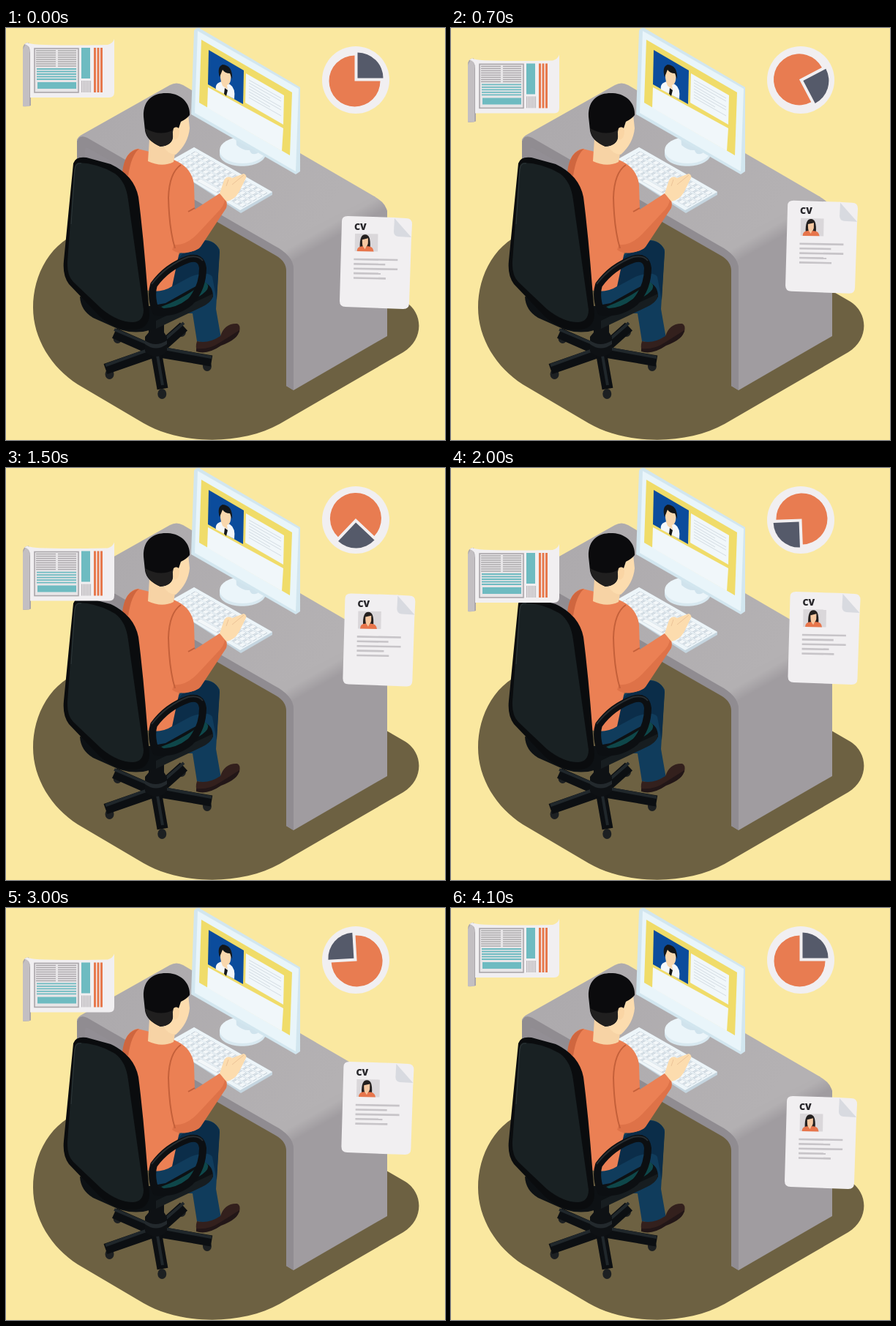
These frames come from a looping animation (600x563 px, 4150 ms). An HTML page:

```html
<!DOCTYPE html>
<html lang="en">
<head>
<meta charset="utf-8">
<title>Working at the desk</title>
<style>
  html, body { margin: 0; width: 100%; height: 100%; overflow: hidden; background: #fae8a0; }
  svg { display: block; width: 100%; height: 100%; }
</style>
</head>
<body>
<svg viewBox="0 0 600 563" preserveAspectRatio="none">
  <defs>
    <linearGradient id="bend" gradientUnits="userSpaceOnUse" x1="441" y1="270" x2="450" y2="286">
      <stop offset="0" stop-color="#b3b0b2"/><stop offset="1" stop-color="#a09ca0"/>
    </linearGradient>
    <linearGradient id="desktop" gradientUnits="userSpaceOnUse" x1="150" y1="100" x2="430" y2="270">
      <stop offset="0" stop-color="#adaaad"/><stop offset="1" stop-color="#b4b1b3"/>
    </linearGradient>
  </defs>

  <rect width="600" height="563" fill="#fae8a0"/>
  <path fill="#6d6142" d="M110 276C60 290 37 338 37 382C37 424 62 464 98 487L188 540C240 570 322 570 374 541L543 443C571 426 571 390 546 374L400 289L255 240H170Z"/>

  <g id="desk">
    <path fill="#928e94" d="M97 152L108 160L165 193V215L97 180Z"/>
    <path fill="#a09ca0" d="M383 320L393 322L521 249V421L393 495L383 489Z"/>
    <path fill="url(#desktop)" d="M97 154Q97 149 105 145L224 78Q233 73 242 78L505 231L372 304L108 153Z"/>
    <path fill="url(#bend)" d="M368 298L503 230Q521 240 521 253L393 327Z"/>
    <path fill="#908c91" d="M97 160Q97 144 111 150L366 297Q393 311 393 329V495L383 489V332Q383 319 369 311L112 164Q108 162 108 168V186L97 180Z"/>
  </g>

  <g id="monitor">
    <path fill="#d8e8f0" d="M292 167V173C294 194 351 194 355 173V167Z"/>
    <ellipse cx="323.500" cy="167" rx="31.500" ry="18" fill="#ebf5fa"/>
    <path fill="#d0e3ed" d="M314 145L344 160V171Q335 175 333 167Q324 168 315 160Z"/>
    <path fill="#d2e6ef" d="M257 4Q258 0 264 0L402 81V196L396 200L253 118Z"/>
    <path fill="#e9f5fa" d="M262 4L400 83L396 196L258 116Z"/>
    <path fill="#f0dc69" d="M267 16L391 88L388 174L264 102Z"/>
    <path fill="#0b4c9c" d="M277 30L325 58L324 104L276 77Z"/>
    <path fill="#f1f7fa" d="M328 62L380 92L379 132L327 102ZM276 81L379 137L377 168L275 109Z"/>
    <path fill="#f4f7fa" d="M287 84Q285 75 296 73L306 77Q314 82 312 97Z"/>
    <path fill="#f8d7ad" d="M294 56Q301 51 307 60Q309 76 302 78L303 84L296 79Q291 68 294 56Z"/>
    <path fill="#141719" d="M292 67Q288 53 296 50Q310 51 309 70L306 62Q299 62 296 57ZM299 82L303 85L301 93L298 90Z"/>
    <g id="screenText" stroke="#d3dce3"></g>
  </g>

  <g id="keyboard">
    <path fill="#c5d5df" d="M224 184L257 163L364 224V228L321 253L224 190Z"/>
    <path fill="#edf5f9" d="M216 186L257 163L364 224L320 249Z"/>
    <g id="keys" transform="matrix(1.050 .600 -.420 .243 257 165)" fill="#f3f7f9" stroke="#bfcad4" stroke-width=".8"></g>
  </g>

  <g id="legs">
    <path fill="#103c5c" d="M196 388L207 342Q236 306 260 291Q283 286 292 303L287 384L294 424Q279 433 261 428L255 390Z"/>
    <path fill="#0b2d49" d="M228 323Q247 300 264 291Q287 288 292 306L288 372L282 340Q276 331 252 340L226 354Z"/>
    <path fill="#33201d" d="M261 428Q276 432 293 421Q299 403 316 404Q321 406 319 415Q310 427 292 432Q274 445 262 442Q258 437 261 428Z"/>
    <path fill="#221617" d="M260 438Q277 440 292 430L319 413Q318 425 294 434Q275 447 260 442Z"/>
  </g>

  <g id="torso">
    <path fill="#eb8054" d="M160 194Q163 168 180 165L196 169Q211 187 229 180Q254 190 257 214L258 248L292 226Q304 233 301 244L264 301Q250 309 237 306L227 353Q212 363 190 358Z"/>
    <path fill="#cf663f" d="M159 197Q162 168 182 165Q171 174 167 202Z"/>
    <path fill="#de7248" d="M227 303Q235 309 247 307Q260 305 266 299L301 246Q303 238 299 232Q300 242 288 253L261 282Q245 298 230 296Z"/>
    <path fill="none" stroke="#c4603a" stroke-width="2" d="M239 187Q223 198 222 232Q223 275 231 301M258 246L249 251"/>
    <path fill="#fcdcae" d="M292 226L298 208Q302 201 309 205L325 199Q331 201 326 209L318 225Q312 235 301 237Z"/>
    <path fill="none" stroke="#ecc398" d="M309 214L325 201M304 207L301 216"/>
  </g>

  <g id="head">
    <path fill="#f7d3a5" d="M196 151L194 182Q213 191 229 183L231 172Z"/>
    <path fill="#fcdcae" d="M231 116L249 118L251 137Q249 158 232 173Q221 173 214 160Z"/>
    <path fill="#0b0b0d" d="M188 121C187 95 205 88 221 89C241 90 252 104 251 119Q246 125 239 128L236 137Q227 134 228 149Q227 160 211 162Q192 154 190 140Z"/>
    <path fill="#201f1f" d="M190 137Q211 149 229 139L228 150Q226 161 211 162Q192 154 190 137Z"/>
    <path fill="#fad5a4" d="M229 137Q235 133 237 140Q237 151 231 153Q226 147 229 137Z"/>
  </g>

  <g id="chair">
    <g id="spokes"></g>
    <path fill="#0e1114" d="M195 394H216V416L220 422V442Q205 456 190 442V422L195 416Z"/>
    <path fill="#23292d" d="M190 427Q204 437 220 427V432Q205 443 190 432Z"/>
    <path fill="#0d1114" d="M101 367L196 380L218 376L270 347Q283 352 283 367Q279 376 266 381L200 412Q178 419 155 412L119 396Q102 386 101 367Z"/>
    <path fill="#0e474a" d="M212 381Q245 369 272 347Q284 355 262 368L222 387Z"/>
    <path fill="#171d20" d="M205 400L283 363Q283 374 268 381L205 411Z"/>
    <path fill="#0a0c0e" d="M92 185Q95 175 110 177L143 186Q175 201 181 231C188 285 192 340 196 392Q195 410 178 412Q153 416 128 394L86 350Q77 338 79 318Z"/>
    <path fill="#192123" d="M99 184Q126 185 149 199Q164 210 167 235L188 385Q188 401 174 402Q153 402 131 384L92 347Q83 338 84 319L93 195Q94 184 99 184Z"/>
    <path fill="none" stroke="#2d3638" d="M89 268L94 193Q95 184 103 185"/>
    <path fill="none" stroke="#0c0f12" stroke-width="10" stroke-linejoin="round" d="M205 388Q197 367 202 351Q220 326 249 316Q267 311 269 328Q269 355 252 374Q231 391 205 388Z"/>
    <path fill="none" stroke="#262d31" stroke-width="2" d="M199 350Q219 324 249 313Q263 310 269 318"/>
  </g>

  <g id="news">
    <path fill="#aaa6aa" d="M23 29Q23 20 31 20L34 26V106Q28 108 23 107Z"/>
    <path fill="#c3bfc2" d="M27 22Q33 25 32 36V107H23V29Z"/>
    <path fill="#f1eff1" d="M29 20Q35 25 139 23Q146 21 148 15V88Q148 95 141 95H33V34Q33 23 25 22Z"/>
    <rect x="39" y="28" width="60" height="60" fill="#e7e5e7" stroke="#aaa6aa" stroke-width="1.600"/>
    <g id="newsLines"></g>
    <path fill="#6ebbc1" d="M43 74H96V83H43ZM103 27H115V69H103Z"/>
    <path stroke="#e7794d" stroke-width="3" d="M121.500 27V88M126 27V88M130.500 27V88"/>
  </g>

  <g id="pie">
    <circle cx="478" cy="71" r="46" fill="#f1eff1"/>
    <g id="dial">
      <path fill="#e87c51" d="M476.500 72.500V37.500A35 35 0 1 0 511.500 72.500Z"/>
      <path fill="#555a6a" d="M480.500 68.500V33.500A35 35 0 0 1 515.500 68.500Z"/>
    </g>
  </g>

  <g id="cv">
    <path fill="#f1eff1" d="M467 257L531 259L554 287L551 376Q551 384 543 384L464 381Q456 381 456 373L459 264Q459 257 467 257Z"/>
    <path fill="#f1eff1" d="M529 259L547 260Q555 260 555 268L554 288Z"/>
    <path fill="#d8dae0" d="M531 260L554 286L536 285Q530 284 530 278Z"/>
    <text x="476" y="275.500" font-family="'Open Sans', 'Noto Sans', sans-serif" font-size="12.500" font-weight="800" fill="#27262a">CV</text>
    <g transform="rotate(1 477 281)">
      <rect x="477" y="281" width="31.500" height="24" fill="#dad7da"/>
      <path fill="#24201f" d="M484 300Q483 282 491 282Q499 282 498 300Z"/>
      <path fill="#e7754b" d="M480 305Q480 298 488 298H495Q502 298 503 305Z"/>
      <path fill="#f6c8a1" d="M487 289L495 287V294Q494 298 493 298L491 302L488 298Q487 296 487 289Z"/>
      <g id="cvLines" stroke="#c7c4c8" stroke-width="2.600"></g>
    </g>
  </g>
</svg>
<script>
const LOOP = 4150, STEP = 50, TURN = 4050, TRAVEL = 89;
const $ = id => document.getElementById(id);

function add(parent, name, attrs) {
  const node = document.createElementNS("http://www.w3.org/2000/svg", name);
  for (const key in attrs) node.setAttribute(key, attrs[key]);
  parent.appendChild(node);
}
const line = (parent, x1, y1, x2, y2, attrs = {}) =>
  add(parent, "line", { x1, y1, x2, y2, ...attrs });

for (let i = 0; i < 7; i++) {
  const y = 71 + i * 4;
  line($("screenText"), 332, y, i % 3 === 2 ? 361 : 376, y + (i % 3 === 2 ? 17 : 25));
}

for (let row = 0; row < 5; row++) {
  for (let col = 0; col < 14; col++) {
    if (row === 4 && col > 4 && col < 9) continue;
    add($("keys"), "rect", { x: 4 + col * 6.8, y: 6 + row * 17, width: 5.3, height: 13, rx: 1 });
  }
}
add($("keys"), "rect", { x: 38, y: 74, width: 26, height: 13, rx: 1 });

// Far legs first, so the near ones overlap them.
for (const [x, y] of [[148, 417], [243, 408], [281, 455], [136, 466], [214, 493]]) {
  const spokes = $("spokes");
  add(spokes, "ellipse", { cx: x + (205 - x) * .08, cy: y + 7, rx: 6, ry: 7, fill: "#1d2022" });
  line(spokes, 205, 442, x, y, { stroke: "#0c0f12", "stroke-width": 15 });
  line(spokes, 205, 436, x, y - 5, { stroke: "#20272b", "stroke-width": 4 });
}

const news = $("newsLines");
for (let y = 31; y < 54; y += 3) {
  line(news, 41, y, 68, y, { stroke: "#aaa6aa", "stroke-width": 1.4 });
  line(news, 71, y, 96, y, { stroke: "#aaa6aa", "stroke-width": 1.4 });
}
for (let y = 56; y < 73; y += 3.5) line(news, 42, y, 96, y, { stroke: "#6ebbc1", "stroke-width": 1.8 });
for (let x = 103.5; x < 116; x += 2) line(news, x, 72, x, 88, { stroke: "#b2aeb2" });

[60, 43, 60, 37, 44].forEach((width, i) => {
  const y = 316 + i * 6.4;
  line($("cvLines"), 476, y, 476 + width, y);
});

function ease(t, start, end) {
  const p = Math.min(1, Math.max(0, (t - start) / (end - start)));
  return (1 - Math.cos(Math.PI * p)) / 2;
}

function draw(time) {
  const t = Math.floor((time % LOOP) / STEP) * STEP;
  const swing = ease(t, 240, 1650) - ease(t, 2265, 3800);
  $("news").setAttribute("transform", `translate(0 ${TRAVEL * swing})`);
  $("cv").setAttribute("transform", `translate(${4.5 * swing} ${-(TRAVEL - 1) * swing})`);
  $("dial").setAttribute("transform", `rotate(${360 * Math.min(1, t / TURN)} 478 71)`);
}

const began = performance.now();
function tick() {
  draw(performance.now() - began);
  requestAnimationFrame(tick);
}
tick();
</script>
</body>
</html>
```
